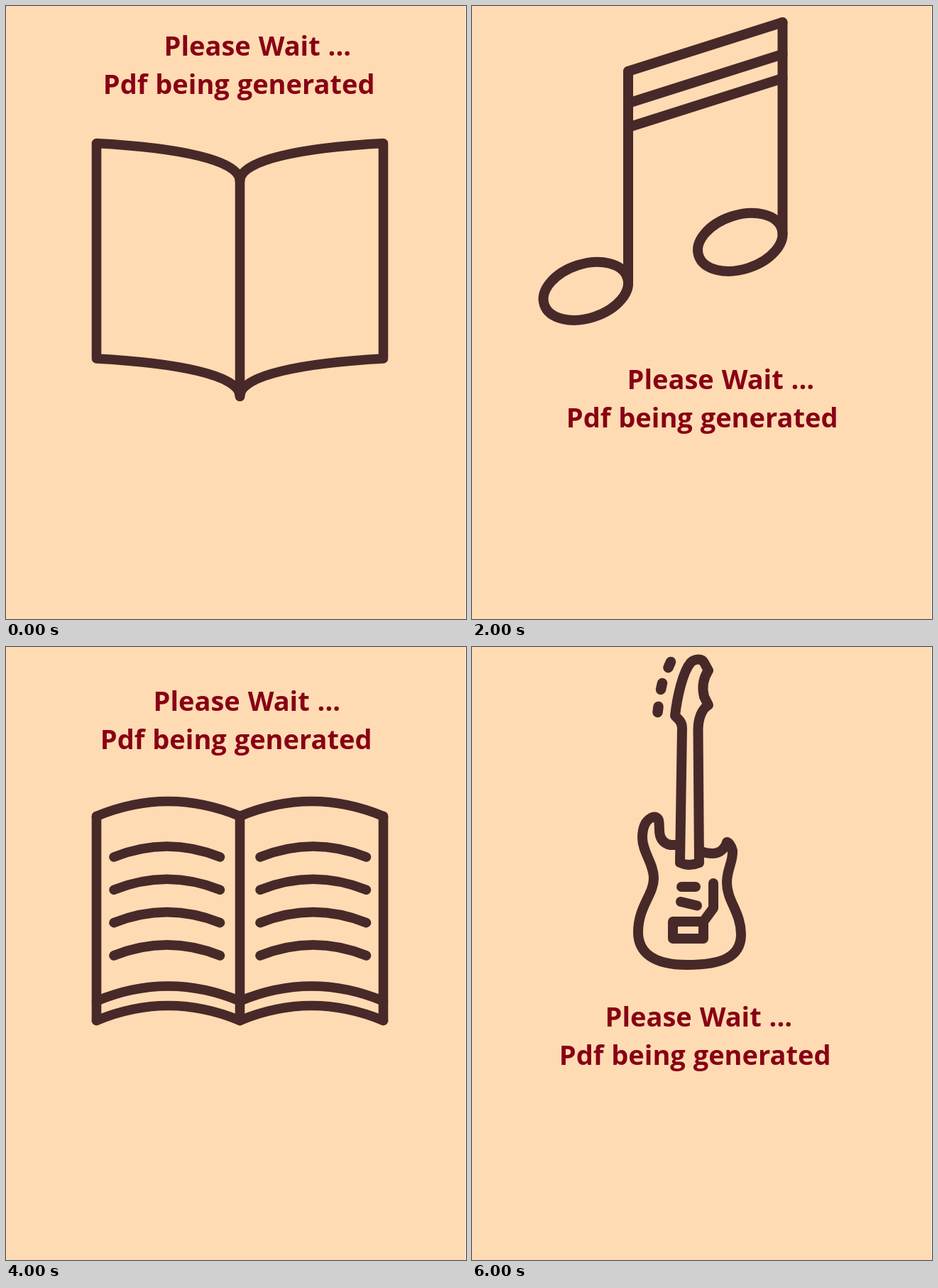
These frames come from a looping animation (648x864 px, 8000 ms). An HTML page with a canvas:

```html
<!DOCTYPE html>
<html lang="en">
<head>
<meta charset="utf-8">
<title>Please wait</title>
<style>
  html, body { margin: 0; width: 100%; height: 100%; overflow: hidden; background: #ffdbb3; }
  canvas { display: block; }
</style>
</head>
<body>
<canvas id="stage" width="648" height="864"></canvas>
<script>
const ctx = document.getElementById('stage').getContext('2d');
const HOLD = 2000;
const INK = '#482929';

function stroke(d, width = 13.6) {
  ctx.lineWidth = width;
  ctx.stroke(new Path2D(d));
}

function caption(x1, x2, y) {
  ctx.fillStyle = '#880015';
  ctx.font = '700 38px "Open Sans", "Noto Sans", sans-serif';
  ctx.wordSpacing = '1px';
  ctx.fillText('Please Wait ...', x1, y);
  ctx.fillText('Pdf being generated', x2, y + 54);
}

function blankBook() {
  const left = 127.5, mid = 329.5, right = 531.5;
  const edge = (x, y) => {
    const k = x < mid ? 1 : -1;
    return `M${x} ${y}C${x + 112 * k} ${y + 6} ${mid} ${y + 23} ${mid} ${y + 53}`;
  };
  for (const x of [left, right]) {
    stroke(edge(x, 193.5) + edge(x, 497) + `M${x} 193.5V497`);
  }
  stroke(`M${mid} 243V550.5`);
  caption(222.6, 136.8, 70);
}

function notes() {
  for (const [x, y] of [[220, 92], [437.5, 23]]) {
    stroke(`M${x} ${y}v298`, 14);
    ctx.beginPath();
    ctx.ellipse(x - 59.7, y + 309.8, 61.5, 38.2, -Math.PI / 10, 0, 2 * Math.PI);
    ctx.stroke();
  }
  for (const y of [92, 137, 171]) stroke(`M220 ${y}l217.5 -69`, 14);
  caption(218.6, 132.8, 540);
}

function writtenBook() {
  const arc = (x, y, w, h) => stroke(`M${x} ${y}q${w / 2} ${-2 * h} ${w} 0`);
  for (const x of [127.5, 329.5]) {
    for (const y of [238.5, 499, 526.5]) arc(x, y, 202, 21);
  }
  for (const x of [127.5, 329.5, 531.5]) stroke(`M${x} 238.5V526.5`);
  for (let i = 0; i < 4; i++) {
    for (const x of [152, 358]) arc(x, 296 + i * 46.3, 149.5, 15);
  }
  caption(207.6, 132.8, 90);
}

function guitar() {
  // tuning pegs
  stroke('M280 21l-3.5 8M268 51l-2 9M262.5 84l-1 8', 14.5);
  // head and neck
  stroke('M293 304L296 114Q296 107 291 102L286 97C289 70 297 35 308 22' +
    'C314 16 324 16 327 22L333 33C325 45 324 58 327 70L333 82' +
    'C324 87 319 100 318.5 115L320 304Q306 310 293 304Z', 14);
  // body
  stroke('M293 279H280C268 277 264 268 264 258L263.5 247C263 240 258 238 252 241' +
    'C243 246 240 258 240 269C240 289 256 305 256 326C256 349 234 366 234 402' +
    'C234 430 255 448 303 448C350 448 379 438 379 405' +
    'C379 374 359 358 359 332C359 313 368 303 367 287' +
    'C365 279 361 275 359 275C358 281 351 291 339 291C332 291 325 289 320 287', 14);
  // pickups, bridge and arm
  stroke('M295 338H315M294 359L317 364.5M283 387H326V411H283ZM340 333V368L326 387', 14);
  caption(187.6, 122.8, 535);
}

const scenes = [blankBook, notes, writtenBook, guitar];

function draw() {
  ctx.fillStyle = '#ffdbb3';
  ctx.fillRect(0, 0, 648, 864);
  ctx.fillStyle = '#fff1e2';
  ctx.fillRect(647, 0, 1, 864);
  ctx.strokeStyle = INK;
  ctx.lineCap = ctx.lineJoin = 'round';
  scenes[Math.floor((performance.now() - start) / HOLD) % scenes.length]();
  requestAnimationFrame(draw);
}

const start = performance.now();
draw();
</script>
</body>
</html>
```
